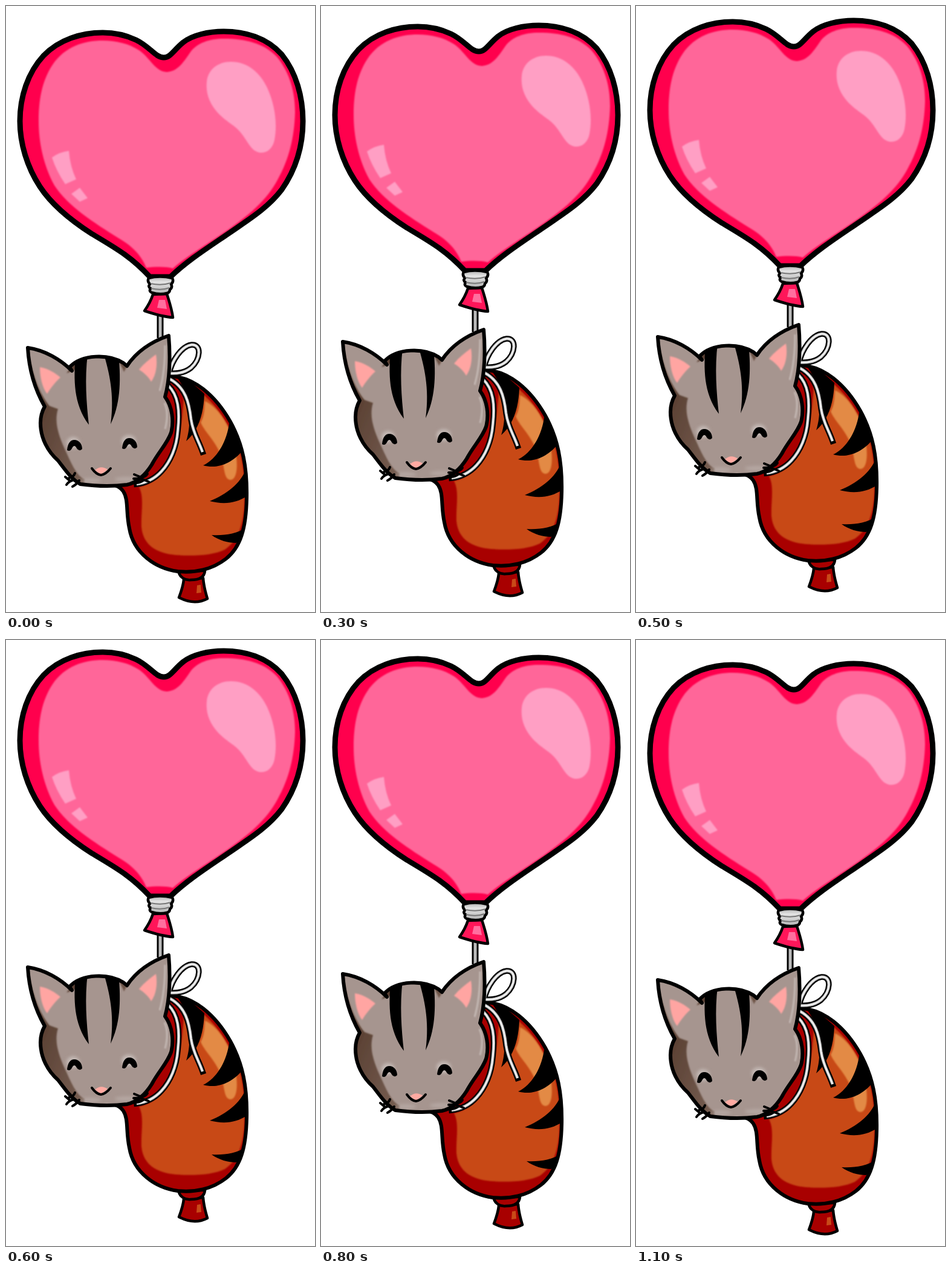
Write an HTML page that moves like this. It is 511 by 1000 pixels and loops after 1200 ms.

```html
<!DOCTYPE html>
<html lang="en">
<head>
<meta charset="utf-8">
<title>Balloon cat</title>
<style>
  html, body { margin: 0; width: 100%; height: 100%; overflow: hidden; background: #fff; }
  svg { display: block; width: 100%; height: 100%; }
  .line { stroke: #000; stroke-width: 6; stroke-linejoin: round; stroke-linecap: round; }
  .thin { stroke-width: 4.5; }
  .open { fill: none; }
</style>
</head>
<body>
<svg viewBox="0 0 511 1000">
  <defs>
    <filter id="soft" x="-30%" y="-30%" width="160%" height="160%"><feGaussianBlur stdDeviation="2.5"/></filter>
    <filter id="edge"><feGaussianBlur stdDeviation=".8"/></filter>
    <linearGradient id="metal" x2="0" y2="1">
      <stop stop-color="#aaa"/><stop offset=".3" stop-color="#e4e4e4"/><stop offset="1" stop-color="#b4b4b4"/>
    </linearGradient>
    <linearGradient id="shade" x2="1" y2="1">
      <stop stop-color="#4b3022"/><stop offset="1" stop-color="#786054"/>
    </linearGradient>
    <path id="body" d="M273 611C310 612 346 642 371 686C392 724 399 762 398 812C397 862 388 893 364 912C341 930 312 936 284 933C247 928 211 903 204 862C198 835 203 815 194 801C190 795 186 793 178 790L240 690Z"/>
    <path id="head" d="M36 564C64 568 90 583 109 602L105 596C126 574 170 574 194 589L200 594C216 570 240 554 269 544C272 578 271 617 263 645C275 661 278 685 273 704C267 722 252 736 241 757C231 773 216 787 200 790C177 793 153 793 123 789C108 781 97 764 86 750C69 735 57 713 57 688C57 676 60 668 64 661C48 633 38 600 36 564Z"/>
    <path id="eye" d="M101 733C102 722 106 716 113 716C121 716 126 723 126 731Q121 736 117 730Q113 722 109 730Q106 736 101 733Z"/>
    <path id="cord" d="M255 508V548"/>
    <g id="bow">
      <path d="M268 626C285 642 288 668 284 702C282 728 272 752 257 768C245 781 232 787 216 789"/>
      <path d="M270 606C274 586 290 561 307 559C324 558 322 583 306 597C296 605 282 607 270 606"/>
      <path d="M270 615C297 629 303 655 306 682C309 704 318 716 325 736"/>
    </g>
    <clipPath id="bodyClip"><use href="#body"/></clipPath>
    <clipPath id="headClip"><use href="#head"/></clipPath>
  </defs>

  <g id="toy">
    <g id="balloon">
      <path class="line" style="stroke-width:9" fill="#ff004d" d="M261 85C247 85 238 67 215 56C196 47 178 44 160 44C125 44 88 55 62 82C36 110 23 150 23 190C23 227 35 266 56 298C75 327 106 353 142 376C184 401 207 414 238 447H272C300 420 335 398 370 374C402 352 433 333 456 303C479 270 491 232 491 190C491 150 480 110 456 80C431 52 395 42 360 42C335 42 308 48 293 60C278 72 272 85 261 85Z"/>
      <path filter="url(#edge)" fill="#f69" d="M266 109C246 108 239 86 220 73C203 62 182 57 160 57C129 57 97 67 77 97C59 124 54 156 54 190C54 225 62 263 80 296C102 330 146 358 186 383C211 397 225 414 232 432C248 430 264 430 276 433C300 412 338 390 369 368C400 346 431 321 449 287C468 253 477 217 478 175C478 143 470 111 448 84C426 61 396 54 360 54C336 54 316 61 305 76C295 90 285 108 266 109Z"/>
      <g fill="#ff9fc4" filter="url(#edge)">
        <path d="M372 92C400 92 420 110 432 135C445 163 449 195 444 221C441 236 431 243 420 242C407 240 402 228 392 214C381 197 367 194 350 176C337 161 330 145 332 125C334 105 350 92 372 92Z"/>
        <path d="M76 250Q88 241 104 239Q106 265 116 286L98 294Q83 272 76 250ZM108 310L122 300L135 317L122 323Z"/>
      </g>
    </g>

    <use href="#cord" class="open" stroke="#000" stroke-width="11"/>
    <use href="#cord" class="open" stroke="#bbb" stroke-width="5"/>
    <path class="line thin" fill="#ff1659" d="M243 476C239 488 234 496 229 503C244 508 260 513 276 514C274 499 270 488 266 475Z"/>
    <path fill="#ff6f9f" d="M253 485H263L266 500L250 498Z"/>
    <path class="line thin" fill="url(#metal)" d="M236 449Q254 444 275 449Q278 455 273 459Q276 464 271 468Q271 473 266 474Q254 477 241 473Q236 471 239 466Q234 463 238 459Q233 454 236 449Z"/>
    <path class="open" stroke="#777" stroke-width="2" d="M239 458Q257 462 272 457M240 466Q257 470 270 465"/>

    <g id="tail" class="line thin" fill="#a80000">
      <path d="M294 946C293 958 289 968 286 976C301 984 318 986 333 978C330 968 327 957 326 944Z"/>
      <path d="M285 932C287 943 296 948 306 947C319 947 328 943 329 932Z"/>
    </g>
    <path fill="#c84a18" d="M316 956L322 955L323 968L315 969Z"/>

    <use href="#body" fill="#a80000"/>
    <g clip-path="url(#bodyClip)">
      <path filter="url(#edge)" fill="#c84a18" d="M295 625C335 636 361 678 381 718C393 748 396 788 394 825C392 856 384 882 362 897C341 907 310 908 281 906C249 903 227 890 224 860C223 835 229 811 220 794C253 787 274 755 284 720C291 690 294 655 295 625Z"/>
      <path filter="url(#edge)" fill="#e38a45" d="M329 652C352 663 370 693 376 720C383 741 386 782 371 782C359 781 362 757 354 738C344 715 327 701 322 687C328 677 328 666 329 652Z"/>
      <path d="M278 607C300 614 315 628 328 640C327 671 319 700 298 718C306 693 303 670 302 651C298 637 290 621 278 607Z
        M370 682C366 722 346 749 326 758C350 765 374 754 390 735L398 720Z
        M396 766C388 787 365 806 337 817C360 823 383 821 402 806Z
        M398 860C380 872 360 874 340 873C352 882 368 886 380 886L394 882Z"/>
    </g>
    <use href="#body" class="line open"/>

    <use href="#bow" class="open" stroke="#000" stroke-width="9.5" stroke-linecap="square"/>
    <use href="#bow" class="open" stroke="#999" stroke-width="5"/>
    <use href="#bow" class="open" stroke="#eee" stroke-width="3"/>

    <use href="#head" fill="#a6958f"/>
    <g clip-path="url(#headClip)">
      <g filter="url(#edge)" fill="url(#shade)">
        <path d="M36 564C42 605 55 640 72 660L86 665C79 687 88 711 98 733C107 752 116 775 130 781L128 796L90 770L45 700Z"/>
        <path d="M100 606L112 590L122 582L116 600Q108 603 100 606ZM186 584L203 590L195 604Z"/>
      </g>
      <path class="open" filter="url(#edge)" stroke="#c3b7b2" stroke-width="3" d="M263 560Q263 605 254 635M262 655Q270 672 263 698"/>
      <g filter="url(#soft)" fill="#c3b8b4">
        <ellipse cx="111" cy="721" rx="11" ry="10"/>
        <ellipse cx="203" cy="718" rx="12" ry="10"/>
        <ellipse cx="140" cy="783" rx="17" ry="4" opacity=".5"/>
        <ellipse cx="199" cy="781" rx="19" ry="4" opacity=".5"/>
      </g>
      <path d="M115 575C112 617 111 656 137 691C133 655 130 615 135 575ZM162 575C170 603 180 640 173 690C188 660 191 622 186 575Z"/>
    </g>
    <use href="#head" class="line open"/>
    <path fill="#ffa5a2" filter="url(#edge)" d="M56 596C70 598 82 606 90 613C82 620 74 630 68 640C60 630 56 612 56 596ZM248 575C238 582 228 590 220 600C228 605 236 612 240 620C248 610 251 592 248 575Z"/>
    <use href="#eye"/>
    <use href="#eye" x="91" y="-3"/>
    <path fill="#ffaaa2" d="M147 766Q157 757 168 765L157 773Z"/>
    <path class="line open" style="stroke-width:4" d="M142 763Q149 773 157 774Q165 773 173 763"/>
    <path class="line open" style="stroke-width:4" d="M114 771Q112 777 104 779M98 777L105 783M112 782Q104 784 100 790M121 783Q116 790 110 793M212 773L224 778Q231 777 234 772M211 780Q221 779 226 781L236 785M216 787Q222 787 228 782"/>
  </g>
</svg>
<script>
  const rise = [0, -3, -6.5, -10, -13, -18, -24, -18, -13, -10, -6.5, -3, 0];
  document.getElementById("toy").animate(
    rise.map(y => ({ transform: `translateY(${y}px)`, easing: "step-end" })),
    { duration: 1200, iterations: Infinity }
  );
</script>
</body>
</html>
```
